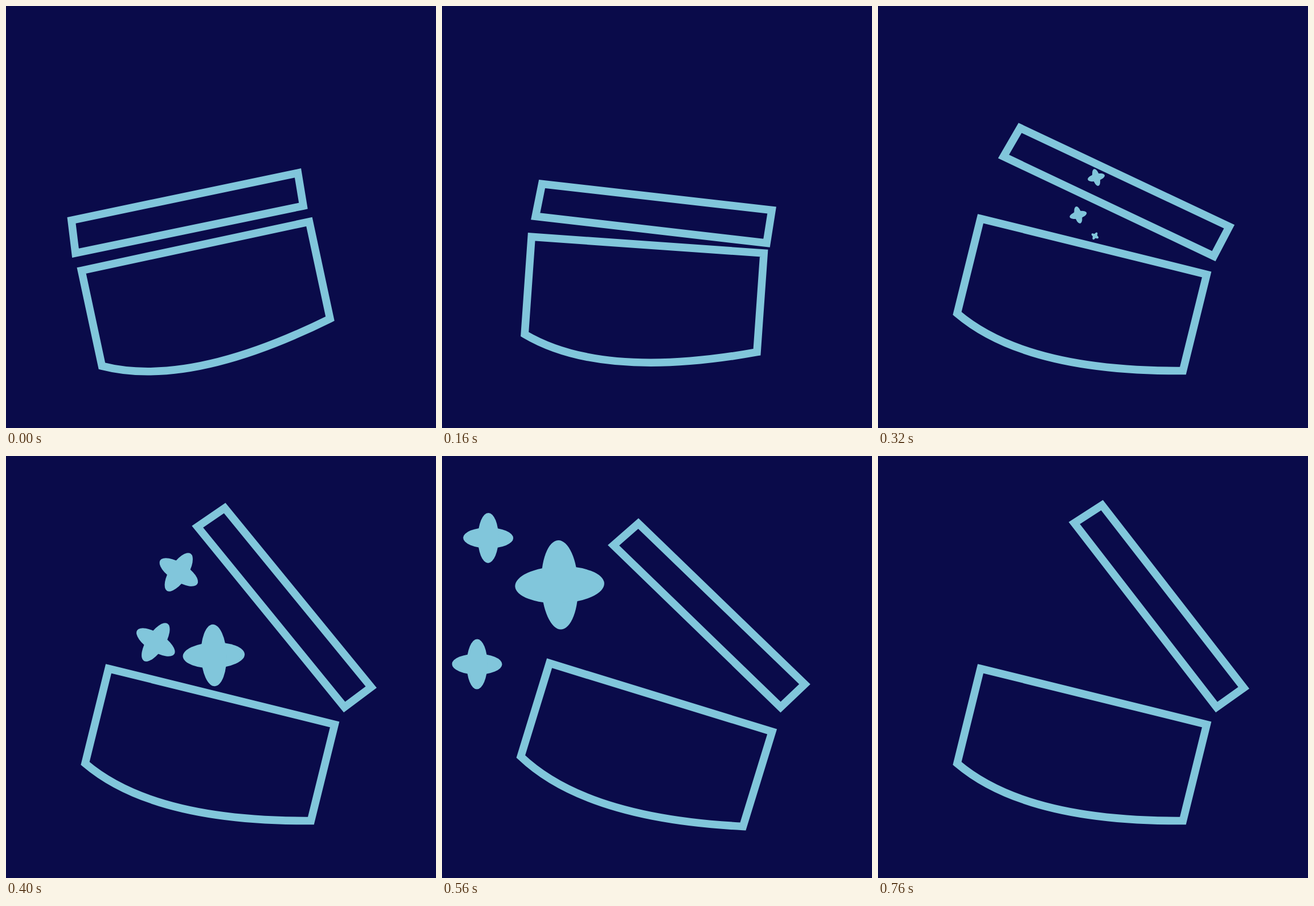
Animation, 755 px wide and 741 px high, one loop 1000 ms. Source, as an HTML page:

```html
<!DOCTYPE html>
<html lang="en">
<head>
<meta charset="utf-8">
<title>Opening jar</title>
<style>
  html, body { margin: 0; width: 100%; height: 100%; overflow: hidden; background: #0a0b4a; }
  svg { display: block; width: 100%; height: 100%; }
  .line { fill: none; stroke: #81c6db; stroke-width: 13.6; stroke-miterlimit: 10; }
  .star { fill: #81c6db; }
</style>
</head>
<body>
<svg viewBox="0 0 755 741">
  <defs>
    <g id="star">
      <ellipse rx="1" ry="0.413"/>
      <ellipse rx="0.413" ry="1"/>
    </g>
  </defs>
  <path id="body" class="line" d="M-204.5-102.6H204.5V71.5Q-63 139.5-204.5 68.8Z"/>
  <path id="lid" class="line" d="M0 0H-408.5L-403.7-57.8L2.4-58.5Z"/>
  <use id="top" class="star" href="#star"/>
  <use id="low" class="star" href="#star"/>
  <use id="big" class="star" href="#star"/>
</svg>
<script>
const LOOP = 1000, STEP = 40;

// Progress 0..1 between two times, slow at both ends
function ease(t, from, to) {
  const k = Math.min(1, Math.max(0, (t - from) / (to - from)));
  return (1 - Math.cos(Math.PI * k)) / 2;
}

// Out and back again: 0 -> 1 -> 0
const swing = (t, from, peak, to) => ease(t, from, peak) - ease(t, peak, to);

// Grows at a steady rate from birth, then shrinks until death
const pulse = (t, birth, grow, death, shrink) =>
  Math.max(0, Math.min(grow * (t - birth), shrink * (death - t)));

// Rise and fall around the highest point
const arc = (t, base, height, peak, width) => base - height * Math.cos((t - peak) / width);

function place(id, x, y, turn, size = 1) {
  document.getElementById(id).setAttribute("transform",
    `translate(${x} ${y}) rotate(${turn}) scale(${size})`);
}

function drawJar(t) {
  const tilt = -12.1 + 25.97 * ease(t, 0, 277) + 6.43 * swing(t, 400, 520, 600);
  place("body", 354, 522, tilt);

  const sway = ease(t, 0, 240), slide = ease(t, 240, 420);
  const open = -11.7 + 24.4 * sway + 39.6 * ease(t, 258, 420) - 8.8 * swing(t, 420, 540, 660);
  place("lid", 522 + 64 * sway + 8.5 * slide, 351 + 87 * sway + 3 * slide, open);
}

function drawStars(t) {
  const size = pulse(t, 268, 0.293, 670, 0.4);
  const turn = -11 - 176 * ease(t, 295, 600);
  place("top", 402 - 388 * ease(t, 262, 672), arc(t, 325, 188, 522, 140), turn, size);
  place("low", 370.5 - 324 * ease(t, 267, 607), arc(t, 576.7, 255, 441, 200), turn, size);
  place("big", 381 - 565 * ease(t, 335, 935), 410 - 187 * ease(t, 285, 585),
    61.8 - 357 * ease(t, 150, 1050), t < 760 ? pulse(t, 308, 0.59, 988, 0.183) : 0);
}

function draw(t) {
  drawJar(t);
  drawStars(t);
}

const start = performance.now();
function tick(now) {
  const t = Math.max(0, now - start) % LOOP;
  draw(Math.floor(t / STEP) * STEP);
  requestAnimationFrame(tick);
}
draw(0);
requestAnimationFrame(tick);
</script>
</body>
</html>
```
